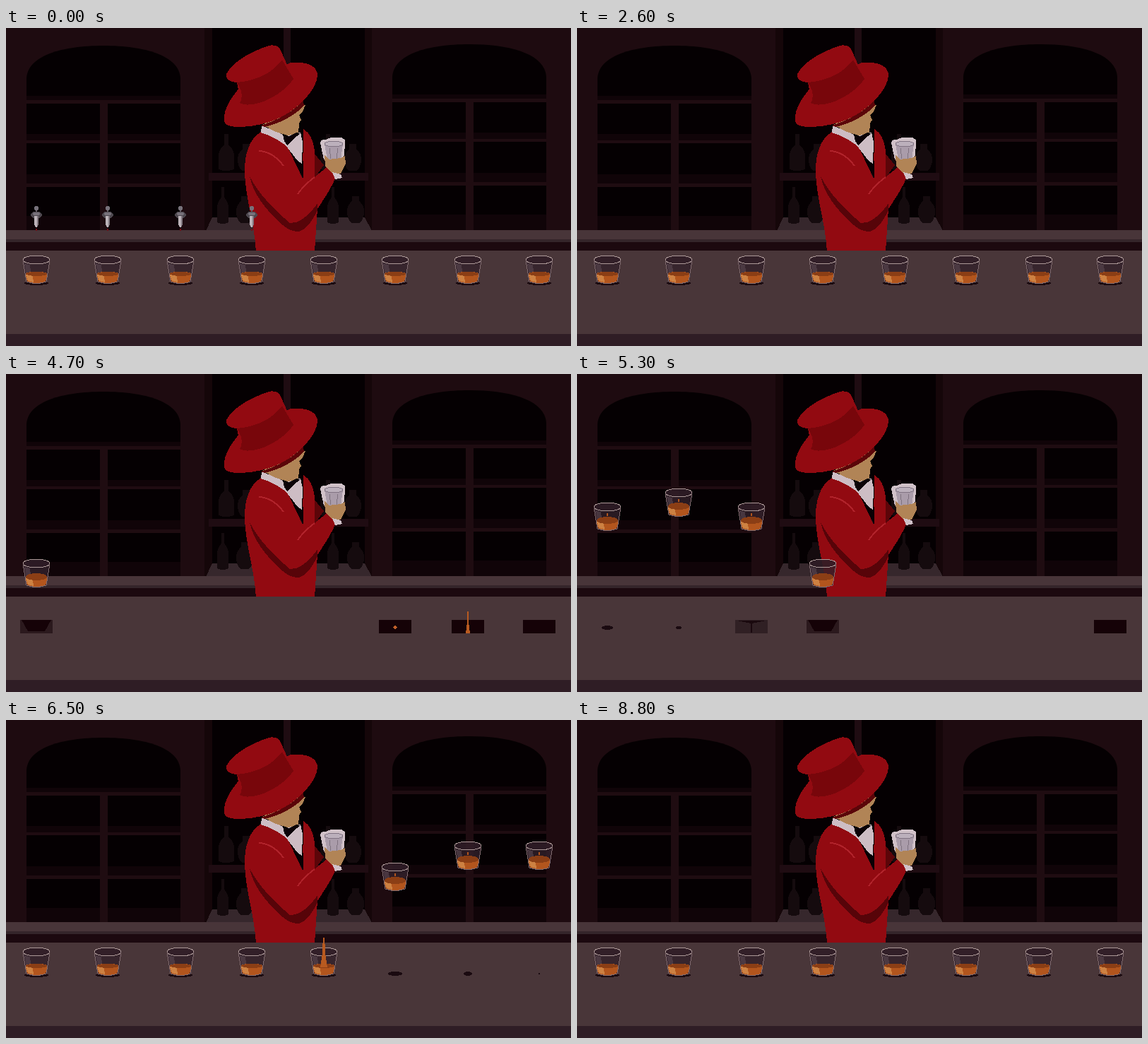
These frames come from a looping animation (800x450 px, 8.9 s). An HTML page:

```html
<!DOCTYPE html>
<html lang="en">
<head>
<meta charset="utf-8">
<title>Bar</title>
<style>
html, body { margin: 0; width: 100%; height: 100%; overflow: hidden; background: #1e0b10; }
svg { display: block; width: 100vw; height: 100vh; }
</style>
</head>
<body>
<svg viewBox="0 0 800 450" shape-rendering="crispEdges">
  <defs>
    <clipPath id="aboveHatch"><rect x="-30" width="60" height="367"/></clipPath>
    <clipPath id="archClip"><path d="M0 290V71C2 39 50 25 109 25S216 39 218 71V290Z"/></clipPath>
    <g id="window" clip-path="url(#archClip)">
      <rect width="218" height="290" fill="#050002"/>
      <path d="M0 96H218V102H0ZM0 150H218V159H0ZM0 207H218V220H0ZM0 266H218V290H0Z" fill="#100408"/>
      <path d="M0 102H218V107H0ZM0 159H218V163H0ZM0 220H218V225H0ZM104 104H115V290H104Z" fill="#1f0c11"/>
    </g>
    <g id="glass">
      <path d="M-19 7C-15 0 15 0 19 7L14 38Q0 43-14 38Z" fill="#33212b" fill-opacity=".8"/>
      <path d="M-17 12L-13 34L-7 35L-9 14Z" fill="#55424c" fill-opacity=".7"/>
      <path d="M-16 26Q0 21 16 26L13 38Q0 43-13 38Z" fill="#b2551d"/>
      <ellipse cy="27" rx="15" ry="3" fill="#8b3e15"/>
      <path d="M-15 28L-5 30L-4 39L-12 37Z" fill="#cd8142"/>
      <ellipse cy="7" rx="19" ry="6" fill="#2e1a25" fill-opacity=".5" stroke="#ac9998"/>
      <path d="M-19 8L-14 38Q0 43 14 38L19 8" fill="none" stroke="#806b6f"/>
    </g>
    <g id="tap">
      <path d="M-1 256H1V262H-1Z" fill="#615a61"/>
      <circle cy="255" r="3" fill="#77717a"/>
      <path d="M-8 263L-4 260H4L8 263V266L4 269H-4L-8 266Z" fill="#4d474e"/>
      <ellipse cy="263" rx="5" ry="2" fill="#77717a"/>
      <path d="M-3 266H3V278L1 282H-1L-3 278Z" fill="#bcb3b9"/>
      <path d="M1 266H3V278L1 282Z" fill="#81777f"/>
    </g>
    <path id="bottle" d="M-3 0H3V15Q11 22 11 31V50Q0 54-11 50V31Q-11 22-3 15Z"/>
    <path id="jug" d="M-5 0H5V7Q13 14 12 24Q11 33 6 38H-6Q-11 33-12 24Q-13 14-5 7Z"/>
  </defs>

  <rect width="800" height="450" fill="#1e0b10"/>
  <use href="#window" x="29"/>
  <use href="#window" x="547" y="-2"/>
  <path d="M281 0H518V286H281Z" fill="#150609"/>
  <path d="M292 0H508V268H292Z" fill="#050002"/>
  <path d="M393 0H403V60H393ZM287 205H513V216H287Z" fill="#1f0c12"/>
  <path d="M292 268H508L518 287H283Z" fill="#36272c"/>
  <g fill="#150b0e">
    <use href="#bottle" x="312" y="150"/>
    <use href="#jug" x="340" y="164"/>
    <use href="#bottle" x="456" y="150"/>
    <use href="#jug" x="491" y="164"/>
    <use href="#bottle" transform="translate(307 225) scale(.75 1)"/>
    <use href="#jug" x="338" y="238"/>
    <use href="#bottle" transform="translate(463 225) scale(.75 1)"/>
    <use href="#jug" x="495" y="238"/>
  </g>
  <path d="M0 286H800V299H0Z" fill="#483539"/>
  <path d="M0 299H800V303H0Z" fill="#34252a"/>
  <path d="M0 303H800V316H0Z" fill="#1c090f"/>

  <g id="barman">
    <path d="M437 178L450 194L437 212Z" fill="#5c0509"/>
    <path d="M361 147C344 157 337 180 338 207C340 245 352 278 354 316H437L441 256C452 239 464 222 468 207L459 193L437 211L437 174C435 158 430 148 421 143L420 213L395 160Z" fill="#920a11"/>
    <path d="M345 210C358 236 382 259 402 276C415 277 430 265 441 248V258Q428 285 414 288Q402 288 392 279C368 258 350 235 345 210Z" fill="#570409"/>
    <path d="M358 174Q378 175 393 195M413 235Q422 222 437 211" fill="none" stroke="#b1232b" stroke-width="2"/>
    <path d="M416 184L421 189V213L413 196Z" fill="#090004"/>
    <path d="M362 138L395 152L417 148L420 161L419 192L412 187L396 166Q380 154 361 148Z" fill="#cdbdc4"/>
    <path d="M363 137L414 107L424 109L420 118L415 123L418 130L415 135L414 149L399 152L382 147Z" fill="#b18456"/>
    <path d="M392 151L401 153L411 148L417 149L407 157L398 166L394 160Z" fill="#0b0207"/>
    <path d="M309 130C308 113 320 98 330 85L403 49C425 47 441 53 441 67C440 86 419 109 392 125C366 139 329 143 315 138Q309 136 309 130Z" fill="#920a11"/>
    <path d="M360 138Q397 127 421 103L422 110Q400 132 366 140Z" fill="#5b0509"/>
    <path d="M312 65C321 48 345 34 372 25Q386 22 390 34L407 72L333 107L327 77Q311 76 312 65Z" fill="#920a11"/>
    <path d="M327 77Q370 73 391 45L407 72Q393 92 365 104Q341 112 331 106Q338 94 327 77Z" fill="#78060b"/>
    <path d="M445 163Q445 157 453 158L460 155L475 155L480 158V166L478 186H450Z" fill="#d0c1c8"/>
    <path d="M451 164H477L474 187H455Z" fill="#aa9caa"/>
    <ellipse cx="464" cy="164" rx="13" ry="4" fill="#bcb0bc" stroke="#817483"/>
    <path d="M458 170L460 185M470 170L468 185" stroke="#807380"/>
    <path d="M451 180L457 186L474 184L480 181L481 192L474 206H462L452 196Z" fill="#b18456"/>
    <path d="M462 204L474 207L476 212L466 214Z" fill="#d0c1c8"/>
  </g>

  <rect y="315" width="800" height="119" fill="#493639"/>
  <rect y="433" width="800" height="17" fill="#2f1d25"/>
  <g id="stations"></g>
</svg>
<script>
const LOOP = 8900, STEP = 100, STAGGER = 220;
const CENTERS = [43, 144, 247, 348, 450, 551, 654, 755];
const REST = 321;
// [local time, top of glass]
const PATH = [
  [2850, REST], [2920, 336], [3050, 371], [4520, 371], [4580, 331],
  [4640, 261], [4700, 261], [4860, 181], [4920, 171], [4960, 171],
  [5050, 161], [5080, 161], [5140, 171], [5180, 171], [5300, 181],
  [5360, 201], [5400, 201], [5470, 251], [5550, REST]
];

function glassTop(t) {
  if (t <= PATH[0][0]) return REST;
  for (let i = 1; i < PATH.length; i++) {
    const [t0, y0] = PATH[i - 1], [t1, y1] = PATH[i];
    if (t <= t1) return 1 + 5 * Math.round((y0 + (y1 - y0) * (t - t0) / (t1 - t0) - 1) / 5);
  }
  return REST;
}

const within = (t, from, to) => t >= from && t < to;
const shape = (d, fill) => `<path d="${d}" fill="${fill}"/>`;
const drop = y => shape(`M0 ${y - 3}L3 ${y}L0 ${y + 3}L-3 ${y}Z`, '#c2602a');

function column(tip, base, half) {
  const bend = tip + (base - tip) * .6;
  return shape(`M-1 ${tip}H1L${half / 2} ${bend}L${half} ${base}H${-half}L${-half / 2} ${bend}Z`, '#b85a20');
}

function hatch(t) {
  const panel = 'M-23 348H23V367H-23Z';
  if (within(t, 2850, 3780)) return shape(panel, '#150207');
  if (within(t, 4520, 4800)) return shape(panel, '#2b191d') + shape('M-21 348H21L12 364H-12Z', '#150207');
  if (within(t, 4800, 4900)) return shape(panel, '#302024') + shape('M-20 349H20L1 353V366H-1V353Z', '#1a090e');
  return '';
}

function shadow(t) {
  if (within(t, 2850, 4900)) return '';
  const rx = within(t, 4900, 5550) ? Math.max(1, (t - 4900) / 47) : 17;
  return `<ellipse cy="${rx < 17 ? 359 : 361}" rx="${rx}" ry="${Math.min(3, rx / 2 + .5)}" fill="#1a0a10"/>`;
}

function glass(t) {
  const y = glassTop(t);
  if (y >= 367) return '';
  const sway = within(t, 4600, 5550)
    ? `<ellipse cy="${y + 26}" rx="15" ry="5" fill="#8b3e15"/>` : '';
  const bead = within(t, 4800, 5550) ? shape(`M-1 ${y + 16}H1V${y + 20}H-1Z`, '#b2551d') : '';
  return `<g clip-path="url(#aboveHatch)"><use href="#glass" y="${y}"/>${sway}${bead}</g>`;
}

function splash(t) {
  if (within(t, 3280, 3450)) return column(336, 367, 3);
  if (within(t, 3450, 3640)) return drop(330 + (t - 3450) * .19);
  if (within(t, 5550, 5600)) return drop(326) + column(331, 355, 8);
  if (within(t, 5600, 5720)) return column(308, 350, 5);
  if (within(t, 5720, 5820)) return drop(314) + column(332, 348, 3);
  return '';
}

function tap(t) {
  if (!within(t, -770, 450)) return '';
  const y = 286 + Math.max(0, t - 150) ** 2 * .0007;
  return `<use href="#tap"/>` + shape(`M-1 ${y - 2}H1V${y + 1}H-1Z`, '#701019');
}

function station(x, time, i) {
  const t = time - i * STAGGER;
  return `<g transform="translate(${x} 0)">${hatch(t)}${shadow(t)}${glass(t)}${splash(t)}${tap(t)}</g>`;
}

const stations = document.getElementById('stations');
const start = performance.now();
let shown = -1;
function draw(now) {
  const time = Math.floor(Math.max(0, now - start) % LOOP / STEP) * STEP;
  if (time !== shown) {
    shown = time;
    stations.innerHTML = CENTERS.map((x, i) => station(x, time, i)).join('');
  }
  requestAnimationFrame(draw);
}
draw(start);
</script>
</body>
</html>
```
